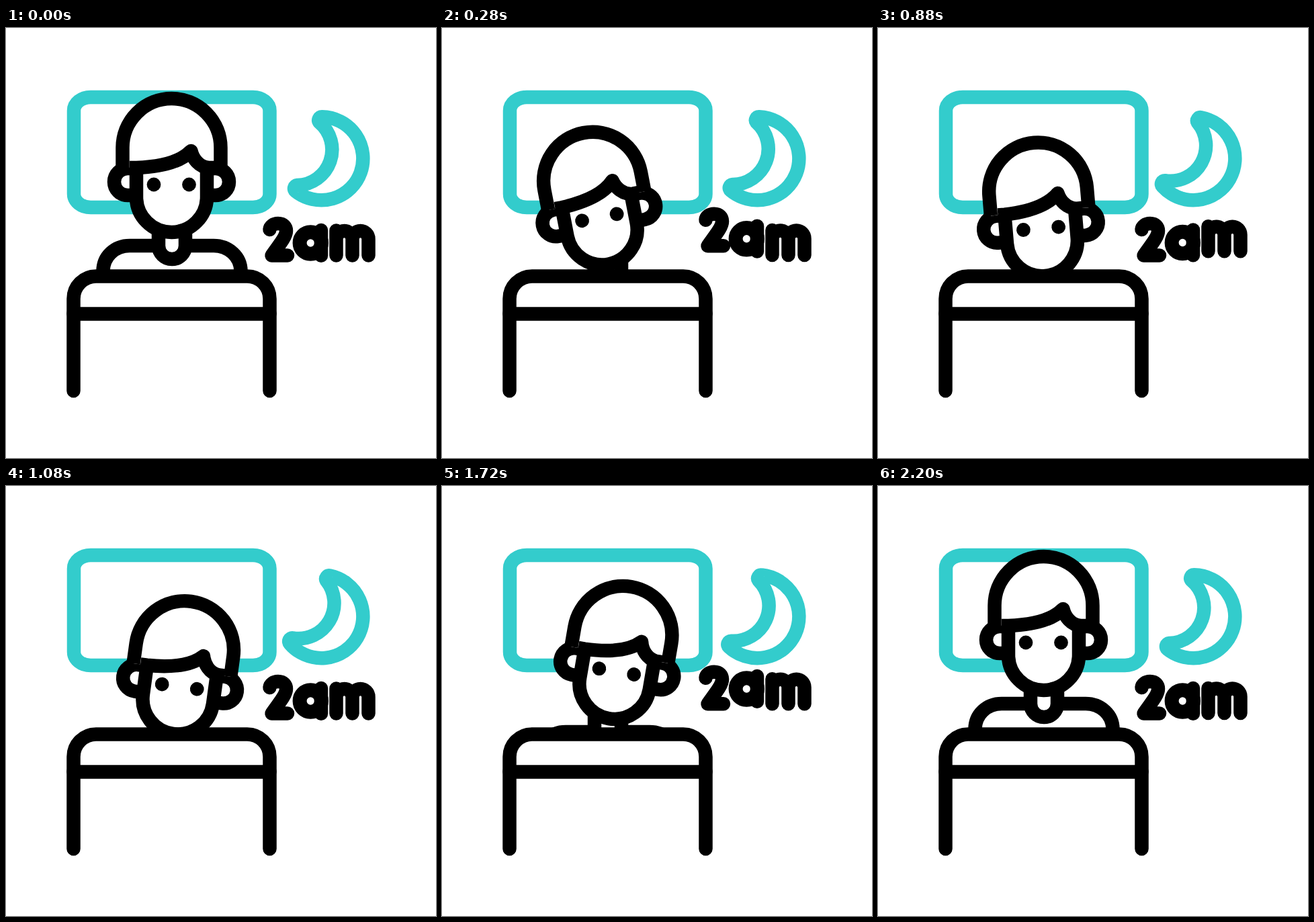
An HTML page that plays this animation: 640x640 px, repeating every 2240 ms.

```html
<!DOCTYPE html>
<html lang="en">
<head>
<meta charset="utf-8">
<title>Awake at 2am</title>
<style>
  html, body { margin: 0; width: 100%; height: 100%; overflow: hidden; background: #fff; }
  svg { display: block; width: 100%; height: 100%; }
  .line { fill: none; stroke: #000; stroke-width: 20.5; stroke-linecap: round; stroke-linejoin: round; }
  .flat { stroke-linecap: butt; }
  .solid { fill: #fff; }
  .teal { stroke: #33cccc; }
</style>
</head>
<body>
<svg viewBox="0 0 640 640" role="img" aria-label="Sleepless person in bed, 2am">
  <rect class="line teal" x="101" y="103" width="291.5" height="164" rx="25" ry="20"/>

  <path id="moon" class="line teal" d="M470.5 132.3 A62 62 0 1 1 431 243 A5 5 0 0 1 433.5 234
    A53 53 0 0 0 466.5 140.5 A5 5 0 0 1 470.5 132.3 Z"/>

  <g id="body" class="line flat">
    <path d="M144.5 374 V362 C144.5 340 162 324 184 324 H309 C331 324 349.5 340 349.5 362 V374"/>
    <path class="solid" d="M227 300 V324 a20 20 0 0 0 40 0 V300"/>
  </g>

  <g id="head" class="line flat">
    <path class="solid" d="M194 209 H181 a20 20 0 0 0 0 40 H194"/>
    <path class="solid" d="M299 209 H312 a20 20 0 0 1 0 40 H299"/>
    <path class="solid" d="M173.5 208 V178 a73 73 0 0 1 146 0 V208"/>
    <path class="solid" d="M194 207 V251.5 a52.5 52.5 0 0 0 105 0 V207"/>
    <path d="M184 208 H194 C225 207 258 201 275.5 183 C278 194 287 207 302 208 H310"/>
    <g fill="#000" stroke="none">
      <circle cx="220" cy="233" r="10.4"/>
      <circle cx="272.5" cy="233" r="10.4"/>
    </g>
  </g>

  <g class="line">
    <path class="solid" d="M100.5 540 V403 a33.5 33.5 0 0 1 33.5 -33.5 H359 a33.5 33.5 0 0 1 33.5 33.5 V540"/>
    <path d="M100.5 425.5 H392.5"/>
  </g>

  <g class="line">
    <path class="letter" d="M392.5 300 C393 295 398 291 405 291 C413 291 417 296 417 302 C417 309 412 316 395.5 338.5 H419"/>
    <g class="letter">
      <circle cx="453.3" cy="320" r="16.2" stroke-width="21"/>
      <path d="M469 301 V338.8"/>
    </g>
    <path class="letter" d="M491.5 338.5 V301.5 M491.5 314 a12 12 0 0 1 24 0 V338.5 M515.5 314 a12 12 0 0 1 24 0 V338.5"/>
  </g>
</svg>
<script>
  const LOOP = 2240, STEP = 40;
  const TILT = 15, SINK = 65, DRIFT = 2.3;
  const HOP = 18, HOP_TIME = 800, HOP_GAP = 1200, LETTER_DELAY = 120;

  const get = id => document.getElementById(id);
  const moon = get("moon"), body = get("body"), head = get("head");
  const letters = document.querySelectorAll(".letter");
  const move = (el, value) => el.setAttribute("transform", value);

  // Eased 0..1 progress between two times
  function ease(t, from, to) {
    const u = Math.min(1, Math.max(0, (t - from) / (to - from)));
    return u * u * (3 - 2 * u);
  }

  // One smooth hop: up and back down
  function hop(t) {
    if (t <= 0 || t >= HOP_TIME) return 0;
    return HOP * (1 - Math.cos(2 * Math.PI * t / HOP_TIME)) / 2;
  }

  function draw(t) {
    const sunk = ease(t, 0, 425) - ease(t, 1480, 2080);
    const tilt = TILT * sunk * (2 * ease(t, 610, 1300) - 1);
    move(body, `translate(0 ${SINK * sunk})`);
    move(head, `translate(${DRIFT * sunk} ${SINK * sunk}) rotate(${tilt} 246.5 304.5)`);

    const swing = 11 * (1 - Math.cos(2 * Math.PI * t / LOOP)) / 2;
    move(moon, `rotate(${swing} 470 194.3)`);

    letters.forEach((letter, i) => {
      const local = t - i * LETTER_DELAY;
      move(letter, `translate(0 ${-hop(local) - hop(local - HOP_GAP)})`);
    });
  }

  const start = performance.now();
  function tick() {
    const t = (performance.now() - start) % LOOP;
    draw(Math.floor(t / STEP) * STEP);
    requestAnimationFrame(tick);
  }
  tick();
</script>
</body>
</html>
```
